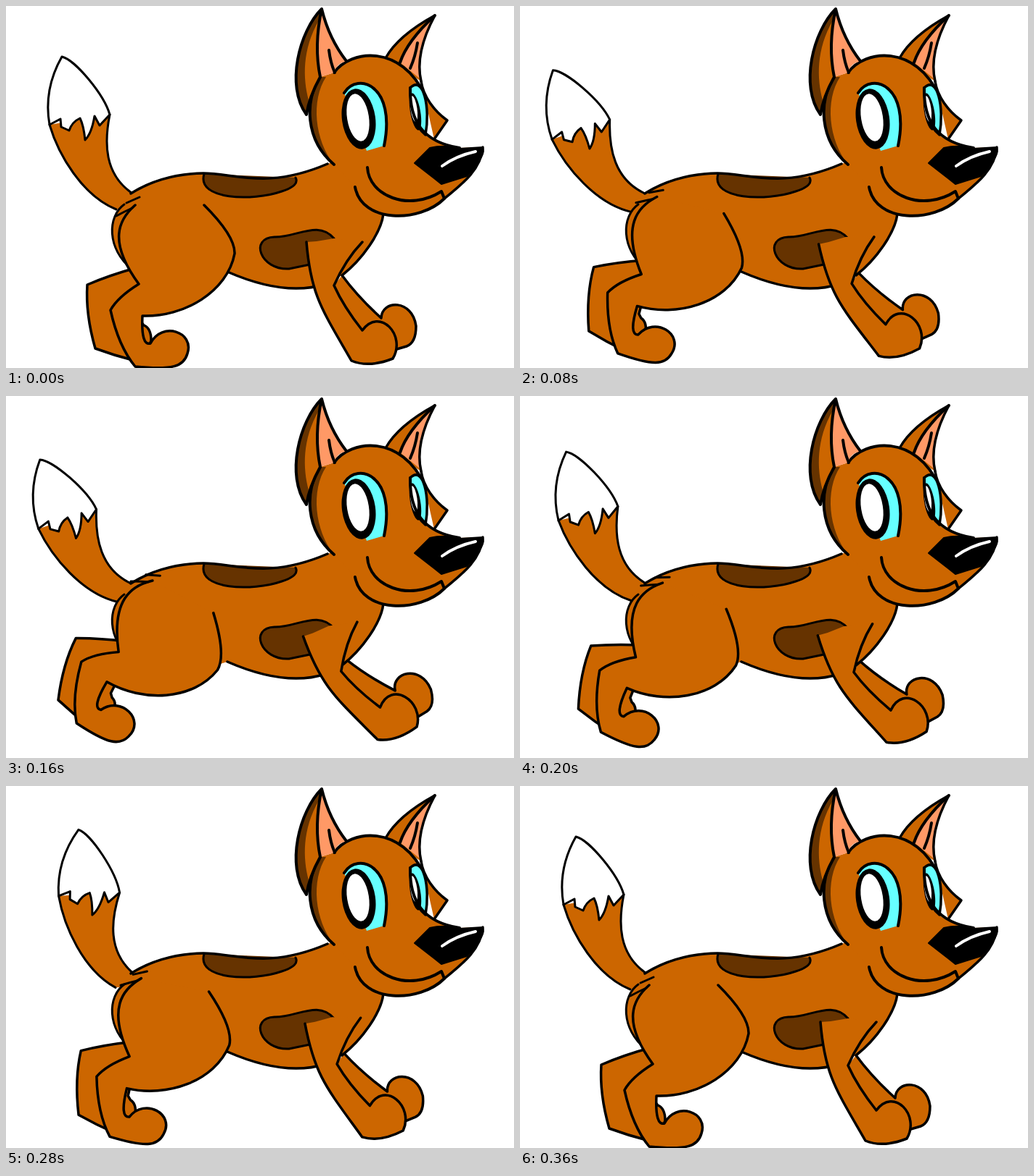
Recreate the animation shown at these times as an HTML page. Size 700 px wide and 500 px high, loop 0.4 s.

```html
<!DOCTYPE html>
<html>
<head>
<meta charset="utf-8">
<style>
html, body { margin: 0; width: 100%; height: 100%; overflow: hidden; background: #fff; }
svg { display: block; width: 700px; height: 500px; }
svg * { stroke-linejoin: round; stroke-linecap: round; }
</style>
</head>
<body>
<svg id="stage" viewBox="0 0 700 500"></svg>
<script>
const FUR = '#cc6600', DARK = '#663300', PINK = '#ff9966', CYAN = '#66ffff', INK = '#000';
const stage = document.getElementById('stage');

function node(parent, tag, attrs) {
  const el = document.createElementNS('http://www.w3.org/2000/svg', tag);
  for (const name in attrs) el.setAttribute(name, attrs[name]);
  return parent.appendChild(el);
}
const group = () => node(stage, 'g', {});
const fill = (g, d, color = FUR) => node(g, 'path', { d, fill: color });
const line = (g, d, width = 3.5, color = INK) =>
  node(g, 'path', { d, fill: 'none', stroke: color, 'stroke-width': width });
function shape(g, d, color = FUR, width = 3.5) {
  fill(g, d, color);
  line(g, d, width);
}
const oval = (g, cx, cy, rx, ry, tilt, color) =>
  node(g, 'ellipse', { cx, cy, rx, ry, fill: color, transform: `rotate(${tilt} ${cx} ${cy})` });

// Layers, back to front
const [tail, farHind, farFront, body, nearHind, nearFront, head] = Array.from({ length: 7 }, group);

// Tail
const tuftEdge = 'L129 165 122 152 Q118 176 109 185 Q107 165 102 155 Q91 160 87 172 L76 167 75 156 60 164';
const tailSides = ['M60 164 C72 205 105 262 152 281', 'M143 150 C135 190 136 232 173 258'];
fill(tail, tailSides[0] + 'L190 275 173 258 C136 232 135 190 143 150 Z');
shape(tail, 'M60 164 C54 130 60 100 77 70 C95 74 135 122 143 150' + tuftEdge, '#fff', 3);
tailSides.forEach(d => line(tail, d, 3));

// Legs; open ends are hidden under nearer parts
shape(farHind, 'M178 362 Q142 372 112 385 C110 415 115 445 123 473 Q150 483 178 490 L194 478 200 462 Q200 445 190 441 L186 436 190 370');
shape(farFront, 'M463 372 Q485 402 517 431 C518 405 560 405 565 442 Q565 465 552 470 L535 475 500 475 445 395');
shape(nearHind, 'M178 275 C155 295 140 325 183 384 Q154 402 144 420 Q155 470 178 498 C230 503 245 498 250 480 C260 450 215 435 199 466 Q186 470 188 428 C245 430 305 395 315 342 Q316 318 273 275');
line(nearHind, 'M166 272 L184 264 M152 290 Q163 284 174 279', 3);
const frontLeg = 'M414 326 C420 400 436 420 476 490 Q500 500 533 487 C552 455 515 415 491 448 Q465 415 452 386 Q468 350 491 326';
fill(nearFront, frontLeg + 'L452 321 428 325 Z');
line(nearFront, frontLeg);

// Body
const back = 'M172 259 Q215 232 272 231 C315 231 360 254 443 218';
const chest = 'C517 313 491 350 463 372';
fill(body, back + 'L500 200 520 287' + chest + 'L440 384 Q385 402 305 367 L230 390 174 364 C138 335 140 290 163 274 Z');
shape(body, 'M273 232 C262 268 340 270 380 256 Q405 248 399 237', DARK, 3);
shape(body, 'M452 321 C430 295 400 320 370 319 C335 320 350 365 390 363 L419 357', DARK, 3);
line(body, back);
line(body, 'M163 274 C140 290 138 335 174 364', 3);
line(body, 'M305 367 Q385 402 440 384 M520 287' + chest);

// Right ear and cheek
const earBack = 'M523 72 Q540 41 591 13 Q563 65 572 104';
fill(head, earBack);
fill(head, 'M588 17 Q552 50 543 78 L570 100 Q563 65 588 17', PINK);
line(head, earBack);
line(head, 'M591 13 Q553 48 543 78 M567 51 Q564 70 557 86', 4);
shape(head, 'M572 104 C575 125 590 145 608 158 L590 184');

// Head
const nape = 'M452 219 C412 185 411 130 433 98';
const crown = 'C475 60 545 52 578 125';
const chin = 'C655 225 630 245 604 266';
fill(head, nape + 'L452 92' + crown + 'L580 180 Q600 192 625 196 L657 195' + chin + 'C570 300 490 300 481 250 Z');
fill(head, nape + 'L441 98 C420 130 425 185 452 219', DARK);
line(head, nape + 'M452 92' + crown, 4);

// Left ear
const earOuter = 'M435 4 C404 35 385 110 414 150 Q418 125 433 98';
const earInner = 'M433 98 Q424 55 435 4 Q445 45 469 76';
fill(head, earOuter + 'Q424 55 435 4', DARK);
fill(head, 'M431 20 C408 60 409 100 417 130 L433 98 Q424 55 431 20');
fill(head, earInner + 'Q455 80 452 92 Z', PINK);
line(head, earOuter + earInner + 'M445 61 Q447 78 453 92', 4);

// Eyes
const lid = 'M466 120 C485 90 538 110 521 193';
fill(head, lid + 'L497 200 Z', CYAN);
line(head, lid, 4);
oval(head, 486, 156, 23, 42, -8, INK);
oval(head, 485, 154, 15, 33, -9, '#fff');
shape(head, 'M557 113 C575 95 585 140 578 178 C562 165 557 140 557 113', CYAN);
oval(head, 564, 146, 7, 26, -10, INK);
oval(head, 562, 142, 4.5, 18, -8, '#fff');

// Muzzle
line(head, 'M557 113 C556 160 575 188 625 196', 4);
line(head, 'M657 195' + chin);
shape(head, 'M563 217 L584 196 Q605 191 625 197 L657 195 Q663 205 635 235 L600 246 590 238 Z', INK, 2);
line(head, 'M601 221 Q620 207 647 201', 4, '#fff');
line(head, 'M498 223 C500 262 555 285 600 256 L604 266 C570 300 490 300 481 250', 4);

// Every moving part swings about its own pivot, at an even pace.
const LOOP = 400, STEP = 40, END = 360;
const lerp = (a, b, k) => a + (b - a) * k;
const stride = t => t < 160 ? t / 160 : Math.max(0, (END - t) / 200);
const wag = t => t < 120 ? lerp(0, -14.2, t / 120)
  : t < 280 ? lerp(-14.2, 6.4, (t - 120) / 160)
  : lerp(6.4, 0, Math.min(1, (t - 280) / 80));
const turn = (g, angle, pivot) => g.setAttribute('transform', `rotate(${angle} ${pivot})`);

function draw() {
  const t = Math.floor(performance.now() % LOOP / STEP) * STEP;
  const s = stride(t);
  turn(tail, wag(t), '175 270');
  turn(farHind, 23 * s, '228 321');
  turn(nearHind, 28 * s, '230 313');
  turn(farFront, -15 * s, '435 346');
  turn(nearFront, -15 * s, '435 346');
  requestAnimationFrame(draw);
}
draw();
</script>
</body>
</html>
```
